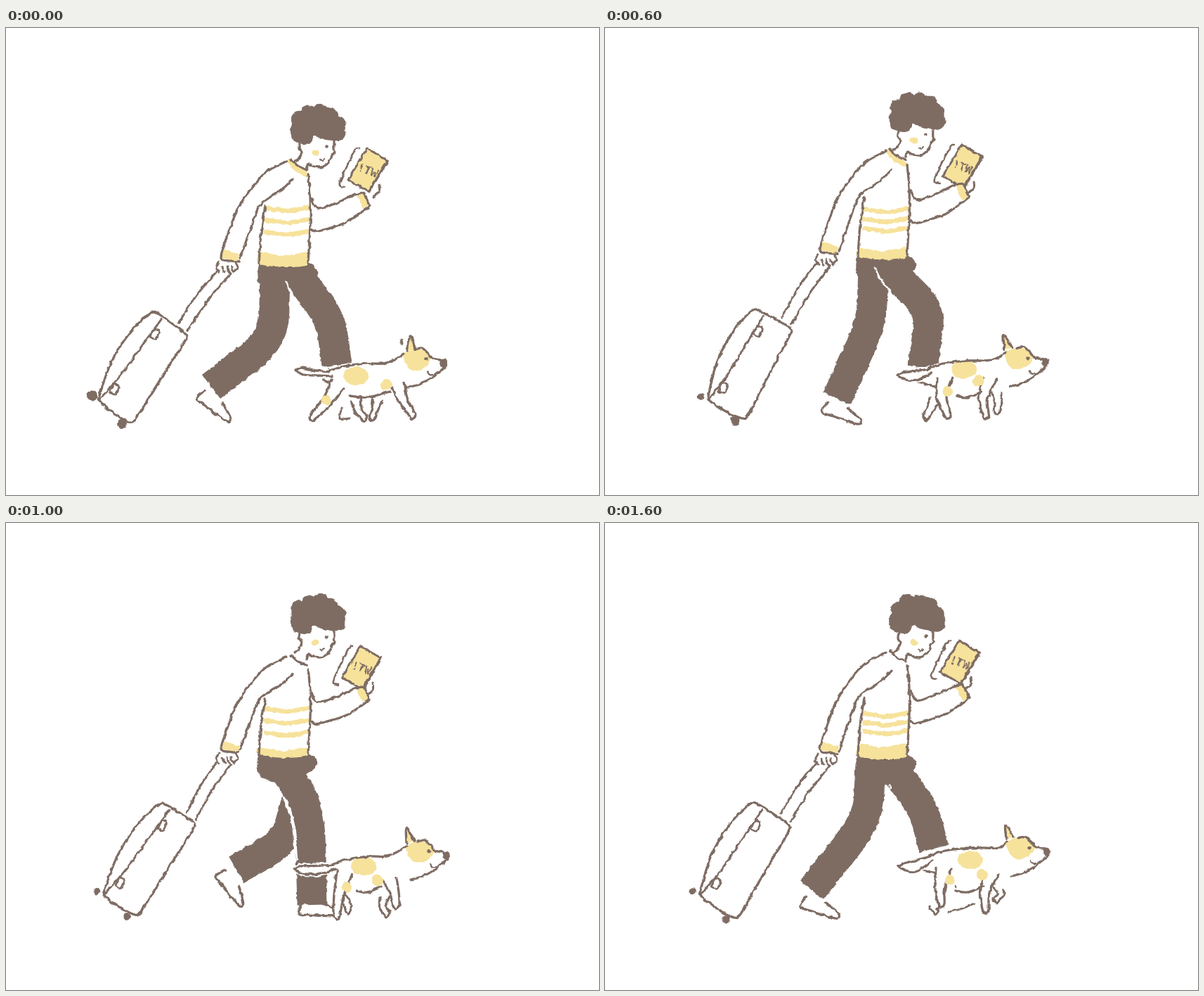
An HTML page that plays this animation: 844 px wide and 664 px high, repeating every 1.8 s.

```html
<!DOCTYPE html>
<html lang="en">
<head>
<meta charset="utf-8">
<title>Walk with a dog</title>
<style>
html, body { margin: 0; width: 100%; height: 100%; overflow: hidden; background: #fff; }
svg { display: block; width: 844px; height: 664px; }
</style>
</head>
<body>
<svg viewBox="0 0 844 664">
  <filter id="rough" filterUnits="userSpaceOnUse" x="0" y="0" width="844" height="664">
    <feTurbulence id="noise" type="fractalNoise" baseFrequency=".13" numOctaves="2" seed="1"/>
    <feDisplacementMap in="SourceGraphic" scale="4.5" xChannelSelector="R" yChannelSelector="G"/>
  </filter>
  <g id="art" filter="url(#rough)" stroke-linejoin="round"></g>
</svg>
<script>
const BROWN = '#7e6c63', YELLOW = '#f6e29b', STEP = 200;

const nums = s => s.split(' ').map(Number);
const move = (p, dx, dy) => p.map((v, i) => v + (i % 2 ? dy : dx));
const at = (s, dx, dy) => move(nums(s), dx, dy);
const flip = p => p.map((v, i) => p[p.length - 2 - i + 2 * (i % 2)]);

// Points given as x, y around an origin, turned by deg
function turn(s, x, y, deg) {
  const p = nums(s), a = deg * Math.PI / 180, c = Math.cos(a), n = Math.sin(a);
  return p.map((v, i) => i % 2 ? y + p[i - 1] * n + v * c : x + v * c - p[i + 1] * n);
}

// Smooth curve through flat x, y points
function curve(p, closed, k = .15) {
  const n = p.length / 2;
  const get = i => {
    i = closed ? (i + n) % n : Math.max(0, Math.min(n - 1, i));
    return [p[i * 2], p[i * 2 + 1]];
  };
  let d = `M${get(0)}`;
  for (let i = 0; i < (closed ? n : n - 1); i++) {
    const [a, b, c, e] = [get(i - 1), get(i), get(i + 1), get(i + 2)];
    d += `C${b.map((v, j) => v + (c[j] - a[j]) * k)} ${c.map((v, j) => v - (e[j] - b[j]) * k)} ${c}`;
  }
  return d + (closed ? 'Z' : '');
}
const path = (d, fill, stroke, w, cap = 'round') =>
  `<path d="${d}" fill="${fill}" stroke="${stroke}" stroke-width="${w}" stroke-linecap="${cap}"/>`;
const line = (p, c = BROWN, w = 3.3) => path(curve(p), 'none', c, w);
const limb = p => path(curve(p), '#fff', BROWN, 3.3);
const blob = (p, c) => path(curve(p, true), c, 'none', 0);
const poly = (p, c, stroke = 'none', w = 0) => path(curve(p, true, 0), c, stroke, w);
const dot = (x, y, r, c = BROWN, ry = r) => `<ellipse cx="${x}" cy="${y}" rx="${r}" ry="${ry}" fill="${c}"/>`;

function drawHead(x, y, n) {
  const lobes = [[416, 147], [418, 130], [431, 121], [447, 120], [461, 125], [471, 137], [472, 149]];
  return line(at('467 160 467 171 468 176 464 181 462 187 455 195 447 198 436 196 431 193 428 201', x, y))
    + line(at('418 164 417 171 421 177 416 186 411 191', x, y))
    + dot(440 + x, 177 + y, 5.5, YELLOW, 4.5) + dot(456.5 + x, 168.5 + y, 2.3)
    + line(at('447 187 450 189 453 186', x, y), BROWN, 2.2)
    + blob(at('406 150 408 159 416 163 424 165 433 163 438 153 448 157 465 160 479 157 480 130 440 113 410 130', x, y), BROWN)
    + lobes.map(([a, b], i) => dot(a + x, b + y, 12 + .9 * Math.sin(i * 3 + n))).join('');
}

function drawBook(x, y, deg) {
  return line(at('-13 -31 -19 -26 -40 18 -33 24', x, y), BROWN, 2.6)
    + poly(turn('-17 -26 17 -26 17 26 -17 26', x, y, deg), YELLOW, BROWN, 3)
    + line(turn('17 -26 17 26', x, y, deg), BROWN, 4)
    + line(at('16 21 16 31 7 38', x, y), BROWN, 3)
    + `<text transform="translate(${x} ${y})rotate(${deg - 10})" y="6" text-anchor="middle" font-family="DejaVu Sans Mono, monospace" font-weight="bold" font-size="16" fill="${BROWN}">!TW</text>`;
}

function drawHand(x, y) {
  return ['-15 2 -19 10 -14 16', '9 3 12 10 6 15', '-10 9 -9 13 -6 16', '-3 8 -2 14 0 17', '3 8 3 12 6 16']
    .map(s => line(at(s, x, y), BROWN, 2.8)).join('');
}

function drawBody({ head, sway, rows, book, collar }, n) {
  const [top, low] = sway, [row, gap, hem] = rows, end = 337 + low;
  const warp = s => nums(s).map((v, i) => i % 2 ? v + top + (low - top) * Math.max(0, Math.min(1, (v - 190) / 147)) : v);
  const stripe = y => line([369, y, 384, y + 2, 400, y + 4, 415, y + 2, 430, y - 1], YELLOW, 6.5);
  return [0, 1, 2].map(i => stripe(row + gap * i)).join('')
    + blob([362, hem, 395, hem + 5, 428, hem, 428, end, 395, end + 3, 360, end - 2], YELLOW)
    + poly(warp('310 315 332 322 330 332 306 327'), YELLOW)
    + drawHand(318, 331 + low)
    + (collar ? line(warp('404 190 412 199 427 208'), YELLOW, 7) : '')
    + ['406 187 414 195 428 202', '400 189 370 205 346 232 329 259 317 290 306 326 318 331 331 332',
      '408 215 391 231 362 251 349 283 333 328', '369 253 363 292 360 335', '430 208 433 240 433 280 430 333',
      '435 243 444 257 470 249 497 236', '435 286 444 289 485 276 517 254'].map(s => line(warp(s))).join('')
    + drawBook(...book)
    + poly(warp('499 237 509 235 518 252 508 257'), YELLOW) + line(warp('497 237 509 235 518 253'))
    + drawHead(...head, n);
}

function drawShoe(x, y, deg) {
  return limb(turn('4 -16 0 0 18 2 38 4 55 4 56 -2 45 -9 34 -14', x, y, deg));
}

// Trouser leg: hip, rounded knee, ankle
function drawLeg([hx, hy, kx, ky, ax, ay, ...shoe]) {
  const near = (x, y) => `${kx + (x - kx) * .38} ${ky + (y - ky) * .38}`;
  return drawShoe(...shoe)
    + path(`M${hx} ${hy}L${near(hx, hy)}Q${kx} ${ky} ${near(ax, ay)}L${ax} ${ay}`, 'none', BROWN, 43, 'butt');
}

function drawLegs({ far, near, gap }, low) {
  return drawLeg(far) + (gap[6] ? line(gap, '#fff', 6) : '') + drawLeg(near)
    + blob(at('361 334 395 336 432 334 442 352 402 376 362 366', 0, low), BROWN)
    + line(gap.slice(0, 6), '#fff', 2.5);
}

// Suitcase spanned by its top left, top right and bottom left corners
function drawBag([x, y, rx, ry, bx, by, w1, w2], low) {
  const put = s => {
    const p = nums(s);
    return p.map((v, i) => i % 2 ? y + p[i - 1] * (ry - y) + v * (by - y) : x + v * (rx - x) + p[i + 1] * (bx - x));
  };
  const clasp = s => line(move([-4, 5, 2, -7, 9, -3, 4, 8, -4, 5], ...put(s)), BROWN, 2.8);
  const shell = '0 0 .18 -.03 .64 -.02 1 0 1.06 .08 1.05 .4 1.05 .73 1.05 1 .93 1.05 .45 1.05 .07 1.02 0 .97 -.18 .62 -.17 .27';
  const rod = (hx, hy, s) => {
    const [ex, ey] = put(s);
    return line([hx, hy + low, (hx + ex) / 2 - 2, (hy + low + ey) / 2 - 2, ex, ey], BROWN, 3);
  };
  return path(curve(put(shell), true), 'none', BROWN, 3.3)
    + line(put('.3 0 .24 .33 .18 .7 .05 1.02'), BROWN, 3)
    + rod(300, 346, '.7 -.06') + rod(320, 349, '.98 -.04')
    + clasp('.31 .17') + clasp('.19 .85')
    + dot(...put('-.14 1.02'), w1) + dot(...put('.83 1.1'), w2);
}

// Paw leg: two sides of a tapering limb
function pawLeg([hx, hy, kx, ky, px, py], w) {
  const len = Math.hypot(px - hx, py - hy), nx = (py - hy) / len, ny = (hx - px) / len;
  const side = (x, y, r) => [x - nx * r, y - ny * r];
  return [...side(hx, hy, w), ...side(kx, ky, w * .65), ...side(px, py, 4), px - ny, py + 5,
    ...side(px, py, -5), ...side(kx, ky, -w * .6), ...side(hx, hy, -w)];
}

function drawDog({ skull, rump, tip, hind, front, hindFar, frontFar, spots, marks }) {
  const [dx, dy, lean] = skull, [rx, ry] = rump, [tx, ty] = tip;
  const nx = 566 + dx, ny = 463 + dy;
  const back = [rx, ry, rx + 22, ry - 7, (rx + nx) / 2, ry - 11, nx - 29, ry - 11, nx - 12, ny + 8, nx, ny];
  const belly = [hind[0] + 17, 523, (hind[0] + front[0]) / 2, 525, front[0] - 12, 517];
  const tailA = [rx + 1, ry + 1, (rx + tx) / 2 + 3, (ry + ty) / 2 - 1, tx + 8, ty - 4, tx, ty];
  const tailB = [rx + 4, ry + 7, (rx + tx) / 2 + 5, ty + 7, tx + 11, ty + 6, tx, ty];
  const base = dx + lean * .5;
  const ear = [571 + base, 459 + dy, 576 + dx + lean, 438 + dy, 582 + base, 456 + dy];
  return poly([...back, ...flip(belly), hind[0] - 8, hind[1]], '#fff', '#fff', 6)
    + poly([...tailA, ...flip(tailB)], '#fff', '#fff', 8)
    + line(pawLeg(hindFar, 8)) + line(pawLeg(frontFar, 7))
    + limb(pawLeg(hind, 11)) + limb(pawLeg(front, 10))
    + dot(spots[0], spots[1], 18, YELLOW, 13) + dot(spots[2], spots[3], 8, YELLOW) + dot(spots[4], spots[5], 7, YELLOW)
    + blob(at('565 466 573 459 583 457 597 459 605 470 600 480 588 486 574 484', dx, dy), YELLOW)
    + poly(ear, YELLOW) + [ear, tailA, tailB, back, belly].map(p => line(p)).join('')
    + line(at('572 511 588 507 606 497 625 482', dx, dy))
    + line(at('582 457 592 455 601 463 607 470 619 472', dx, dy))
    + line(at('600 489 603 493 607 493', dx, dy), BROWN, 2.4)
    + dot(598 + dx, 470.5 + dy, 2.7) + dot(622.5 + dx, 476.5 + dy, 5.3, BROWN, 6)
    + marks.map(s => line(nums(s), BROWN, 2.8)).join('');
}

const contact = {
  head: [0, 0], sway: [0, 0], rows: [256, 17, 319], book: [515, 202, 31], collar: true,
  far: [416, 352, 462, 414, 471, 479, 452, 500, 10], near: [383, 345, 381, 442, 292, 510, 271, 527, 32],
  gap: [399, 361, 402, 368, 408, 378],
  bag: [206, 405, 256, 436, 131, 525, 7.5, 7],
  skull: [0, 0, 0], rump: [459, 488], tip: [412, 487], spots: [498, 495, 541, 507, 456, 529],
  hind: [472, 506, 458, 530, 436, 553], front: [558, 508, 566, 530, 578, 551],
  hindFar: [498, 528, 502, 544, 509, 554], frontFar: [529, 529, 525, 543, 521, 553],
  marks: ['562 443 563 449', '478 540 475 555 488 555']
};
const passing = {
  head: [0, -19], sway: [-17, -13], rows: [248, 14, 307], book: [509, 190, 33], collar: true,
  far: [412, 350, 453, 410, 403, 496, 382, 509, 31], near: [384, 346, 388, 395, 355, 540, 337, 560, 4],
  gap: [379, 335, 390, 357, 409, 383],
  bag: [209, 402, 264, 427, 146, 525, 5, 6.5],
  skull: [3, -7, -8], rump: [466, 480], tip: [414, 492], spots: [515, 483, 533, 502, 485, 513],
  hind: [482, 493, 474, 520, 480, 545], front: [546, 495, 541, 525, 546, 552],
  hindFar: [472, 545, 470, 549, 470, 553], frontFar: [560, 520, 563, 530, 556, 536], marks: []
};
const stride = {
  head: [-2, 1], sway: [3, 3], rows: [268, 13, 318], book: [509, 204, 29],
  far: [414, 355, 461, 414, 467, 480, 450, 500, 10], near: [381, 352, 373, 425, 291, 527, 270, 548, 14],
  gap: [373, 359, 383, 373, 402, 387],
  bag: [206, 403, 257, 437, 129, 525, 8, 8],
  skull: [5, 4, -17], rump: [455, 488], tip: [418, 496], spots: [507, 487, 530, 502, 490, 521],
  hind: [486, 502, 485, 530, 494, 556], front: [549, 502, 536, 530, 537, 550],
  hindFar: [466, 515, 457, 532, 443, 552], frontFar: [556, 518, 556, 538, 560, 552],
  marks: ['505 545 524 537', '506 553 518 547', '468 536 470 544']
};
const push = {
  head: [0, -7], sway: [1, -6], rows: [264, 17, 319], book: [506, 206, 30],
  far: [414, 393, 397, 453, 328, 493, 298, 502, 47], near: [393, 345, 432, 405, 436, 543, 417, 556, -2],
  gap: [397, 391, 409, 425, 414, 478, 414, 480],
  bag: [217, 400, 268, 427, 138, 525, 5, 5],
  skull: [4, -4, -10], rump: [466, 485], tip: [410, 492], spots: [509, 488, 529, 508, 485, 518],
  hind: [482, 497, 474, 530, 470, 558], front: [546, 506, 553, 525, 555, 544],
  hindFar: [474, 530, 485, 540, 487, 550], frontFar: [539, 532, 536, 545, 541, 555], marks: []
};
const rise = {
  head: [0, -17], sway: [-8, -13], rows: [257, 16, 312], book: [511, 190, 29],
  far: [415, 345, 453, 407, 403, 495, 384, 528, 18], near: [384, 344, 391, 400, 362, 538, 353, 566, 2],
  gap: [415, 362, 413, 410, 402, 478],
  bag: [222, 404, 269, 428, 152, 529, 5, 5.5],
  skull: [-1, 0, 0], rump: [462, 492], tip: [424, 492], spots: [520, 495, 546, 512, 478, 514],
  hind: [474, 506, 456, 530, 436, 553], front: [558, 508, 568, 533, 580, 553],
  hindFar: [497, 528, 503, 543, 510, 554], frontFar: [523, 530, 527, 543, 526, 554],
  marks: ['564 453 560 443 567 441']
};
const land = {
  head: [0, -7], sway: [-5, -4], rows: [271, 12.5, 314], book: [505, 198, 31],
  far: [412, 350, 454, 408, 468, 463, 450, 492, 10], near: [378, 343, 374, 422, 294, 522, 278, 546, 13],
  gap: [404, 372, 406, 374, 407, 377],
  bag: [207, 399, 262, 430, 134, 525, 5, 6],
  skull: [6, -9, -12], rump: [462, 473], tip: [417, 488], spots: [520, 479, 537, 500, 491, 507],
  hind: [482, 491, 477, 520, 478, 541], front: [550, 498, 541, 525, 541, 550],
  hindFar: [470, 545, 468, 548, 470, 551], frontFar: [560, 520, 564, 528, 557, 535],
  marks: ['489 553 510 548 525 541', '498 516 500 518']
};
const reach = {
  far: [412, 350, 464, 402, 452, 482, 436, 499, 12], near: [382, 345, 379, 420, 330, 527, 309, 546, 14],
  gap: [384, 340, 392, 357, 406, 374]
};

// In-between pose: t from a to b, or a per-key amount
function mix(a, b, t, extra) {
  const out = { ...a };
  for (const k in a) if (typeof a[k][0] === 'number') {
    const u = t[k] ?? t.all;
    out[k] = a[k].map((v, i) => v + ((b[k][i] ?? v) - v) * u);
  }
  return { ...out, marks: [], ...extra };
}

const poses = [
  contact,
  mix(contact, passing, { all: .5, bag: .2 }, { far: push.far, near: push.near, gap: push.gap }),
  passing,
  mix(passing, stride, { all: .5, head: .1, sway: .15, bag: .02 }, reach),
  stride, push, rise,
  mix(rise, land, { all: .5, sway: .1, bag: .03 }, { ...reach, head: [0, -22] }),
  land
].map((p, i) => drawBag(p.bag, p.sway[1]) + drawLegs(p, p.sway[1]) + drawBody(p, i) + drawDog(p));

const art = document.getElementById('art'), noise = document.getElementById('noise');
let shown = -1;

function render(ms) {
  const i = Math.floor(ms / STEP) % poses.length;
  if (i === shown) return;
  shown = i;
  noise.setAttribute('seed', i + 1);
  art.innerHTML = poses[i];
}

const start = performance.now();
function tick() {
  render(performance.now() - start);
  requestAnimationFrame(tick);
}
tick();
</script>
</body>
</html>
```
